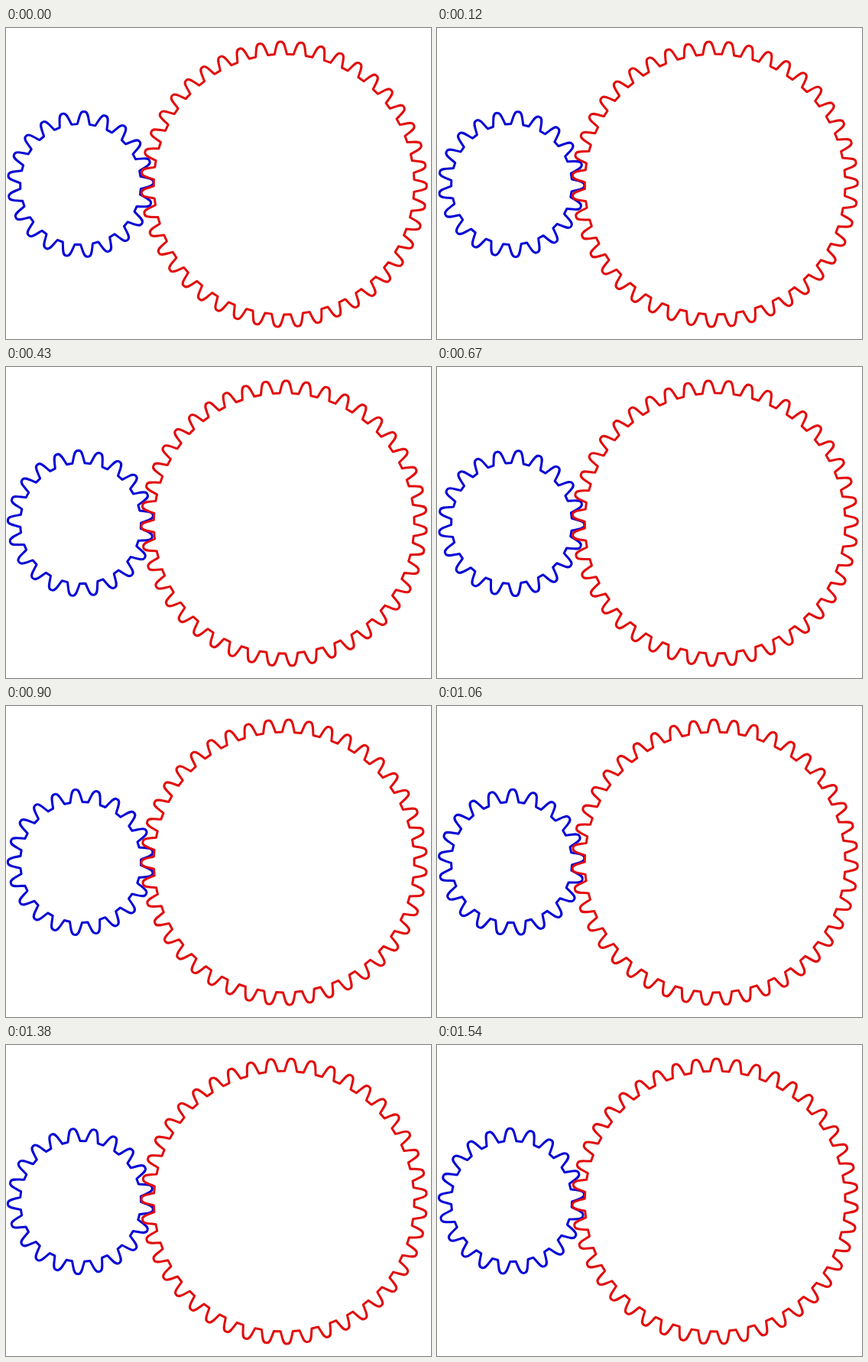
These frames come from a looping animation (556x407 px, 1620 ms). An HTML page with a canvas:

```html
<!DOCTYPE html>
<html lang="en">
<head>
<meta charset="utf-8">
<title>Meshing gears</title>
<style>
  html, body { margin: 0; width: 100%; height: 100%; overflow: hidden; background: #fff; }
  canvas { display: block; }
</style>
</head>
<body>
<canvas id="stage" width="556" height="407"></canvas>
<script>
const ctx = document.getElementById('stage').getContext('2d');
const LOOP = 1620;
const LAST_STEP = 19;
const TURN_PER_STEP = 1.217; // degrees, large gear

const RAD = Math.PI / 180;
const CENTER_Y = 204.5;
const small = { x: 97.6, teeth: 21, radius: 87.3, phase: 2.75, color: '#0505d6' };
const large = { x: 363.7, teeth: 43, radius: 178.7, phase: -1.45, color: '#e20c0c' };

// Half a tooth as [height above pitch circle, half width]
const root = [-8.3, 8.1], low = [-0.3, 5.8], high = [7.9, 5.5], tip = [7.9, 0.8];

// The steps fall on a 10 ms clock
const changeTime = step => 10 * Math.round(11.68 + 7.88 * step);

function stepAt(time) {
  let step = 0;
  while (step < LAST_STEP && changeTime(step) <= time) step++;
  return step;
}

function drawGear({ x, teeth, radius, phase, color }, turn) {
  const start = (phase + turn) * RAD;
  ctx.beginPath();
  for (let i = 0; i < teeth; i++) {
    const axis = start + i * 2 * Math.PI / teeth;
    const at = ([height, half], side) => {
      const r = radius + height, a = axis + side * half / r;
      return [x + r * Math.sin(a), CENTER_Y - r * Math.cos(a)];
    };
    ctx.lineTo(...at(root, -1));
    ctx.bezierCurveTo(...at(low, -1), ...at(high, -1), ...at(tip, -1));
    ctx.lineTo(...at(tip, 1));
    ctx.bezierCurveTo(...at(high, 1), ...at(low, 1), ...at(root, 1));
  }
  ctx.closePath();
  ctx.strokeStyle = color;
  ctx.stroke();
}

function render() {
  const turn = TURN_PER_STEP * stepAt(performance.now() % LOOP);
  ctx.fillStyle = '#fff';
  ctx.fillRect(0, 0, 556, 407);
  ctx.lineWidth = 3;
  ctx.lineJoin = 'round';
  drawGear(small, turn * large.teeth / small.teeth);
  drawGear(large, -turn);
  requestAnimationFrame(render);
}
render();
</script>
</body>
</html>
```
